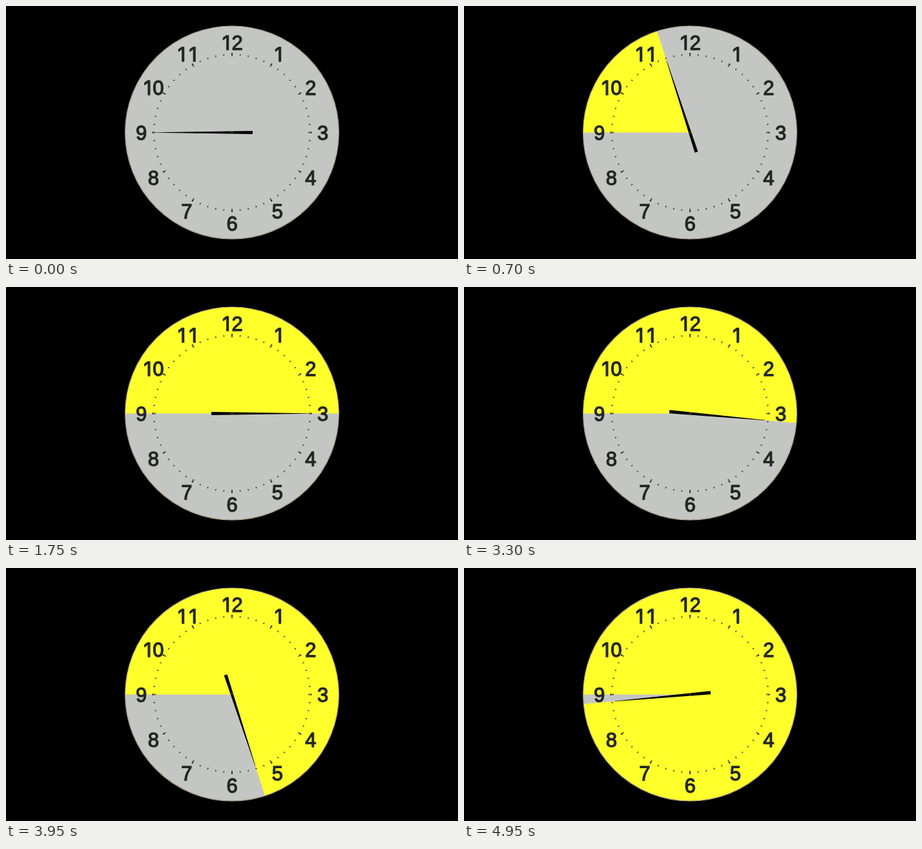
Write an HTML page with a canvas that moves like this. It is 700 px wide and 393 px high and loops after 5 s.

```html
<!DOCTYPE html>
<html lang="en">
<head>
<meta charset="utf-8">
<title>Clock sweep</title>
<style>
  html, body { margin: 0; width: 100%; height: 100%; overflow: hidden; background: #000; }
  canvas { display: block; }
</style>
</head>
<body>
<canvas id="stage" width="700" height="393"></canvas>
<script>
const ctx = document.getElementById('stage').getContext('2d');
const CX = 350, CY = 196.5, RADIUS = 165.5, NUMERAL_RADIUS = 140.5;
const LOOP = 5000, STEP = 50, PAUSE_START = 1750, PAUSE = 1500;
const STEPS = (LOOP - PAUSE) / STEP;
const TAU = Math.PI * 2;

// Clockwise angle swept from nine o'clock; the hand rests at three o'clock.
function sweepAt(time) {
  const running = time < PAUSE_START ? time : Math.max(PAUSE_START, time - PAUSE);
  return Math.floor(running / STEP) / STEPS * TAU;
}

function drawDisc(sweep) {
  ctx.fillStyle = '#c4c6c4';
  ctx.beginPath();
  ctx.arc(CX, CY, RADIUS, 0, TAU);
  ctx.fill();
  if (sweep > 0) {
    ctx.fillStyle = '#ffff2b';
    ctx.beginPath();
    ctx.moveTo(CX, CY);
    ctx.arc(CX, CY, RADIUS, Math.PI, Math.PI + sweep);
    ctx.fill();
  }
  ctx.strokeStyle = '#a3947f';
  ctx.lineWidth = 1.2;
  ctx.beginPath();
  ctx.arc(CX, CY, RADIUS, 0, TAU);
  ctx.stroke();
}

function drawTick(angle, inner, outer, width) {
  const dx = Math.cos(angle), dy = Math.sin(angle);
  ctx.lineWidth = width;
  ctx.beginPath();
  ctx.moveTo(CX + dx * inner, CY + dy * inner);
  ctx.lineTo(CX + dx * outer, CY + dy * outer);
  ctx.stroke();
}

function drawTicks() {
  ctx.strokeStyle = '#232523';
  for (let i = 0; i < 60; i++) {
    const angle = i / 60 * TAU;
    if (i % 5 === 0) {
      drawTick(angle, 118.5, 120, 2);
      drawTick(angle, 120.7, 123.5, 2.2);
    } else {
      drawTick(angle, 119.9, 122.2, 1.4);
    }
  }
}

// Centres the visible ink of a digit; the footless 1 comes from another face.
function drawDigit(digit, x, y) {
  ctx.font = digit === '1'
    ? '30px Inter, sans-serif'
    : '31px "Liberation Sans", Arial, sans-serif';
  const box = ctx.measureText(digit);
  const left = x + (box.actualBoundingBoxLeft - box.actualBoundingBoxRight) / 2;
  const base = y + (box.actualBoundingBoxAscent - box.actualBoundingBoxDescent) / 2;
  ctx.fillText(digit, left, base);
  ctx.strokeText(digit, left, base);
}

function drawNumerals() {
  ctx.fillStyle = ctx.strokeStyle = '#242724';
  ctx.lineWidth = 1.3;
  ctx.lineJoin = 'round';
  for (let hour = 1; hour <= 12; hour++) {
    const angle = hour / 12 * TAU;
    const nudge = hour === 1 || hour === 11 ? 1.3 : 0;
    const x = CX + Math.sin(angle) * NUMERAL_RADIUS + nudge;
    const y = CY - Math.cos(angle) * NUMERAL_RADIUS + 0.5;
    const label = String(hour);
    if (label.length === 1) {
      drawDigit(label, x, y);
    } else {
      drawDigit(label[0], x - 9.5, y);
      drawDigit(label[1], x + 8, y);
    }
  }
}

function drawHand(sweep) {
  ctx.save();
  ctx.translate(CX, CY);
  ctx.rotate(Math.PI + sweep);
  ctx.fillStyle = '#000';
  ctx.beginPath();
  ctx.moveTo(-32, -2.6);
  ctx.lineTo(117, -0.3);
  ctx.lineTo(117, 0.3);
  ctx.lineTo(-32, 2.6);
  ctx.fill();
  ctx.restore();
  ctx.fillStyle = '#3c3d3b';
  ctx.beginPath();
  ctx.arc(CX, CY, 1.4, 0, TAU);
  ctx.fill();
}

function render(now) {
  const sweep = sweepAt(now % LOOP);
  ctx.fillStyle = '#000';
  ctx.fillRect(0, 0, 700, 393);
  drawDisc(sweep);
  drawTicks();
  drawNumerals();
  drawHand(sweep);
}

function frame() {
  render(performance.now());
  requestAnimationFrame(frame);
}
frame();
</script>
</body>
</html>
```
